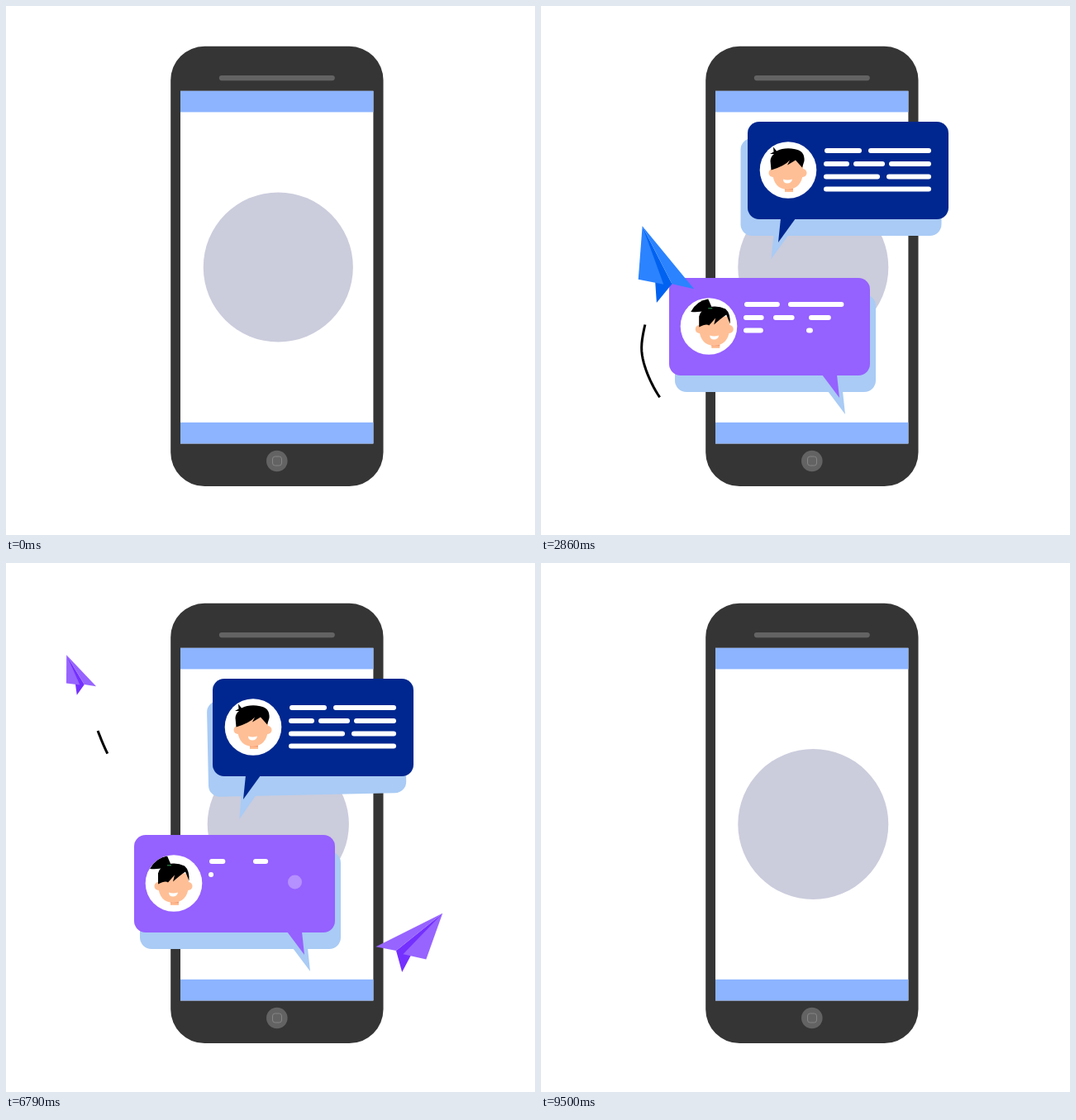
Write an HTML page with a canvas that moves like this. It is 640 by 640 pixels and loops after 9570 ms.

```html
<!DOCTYPE html>
<html lang="en">
<head>
<meta charset="utf-8">
<title>Phone chat</title>
<style>
html, body { margin: 0; width: 100%; height: 100%; overflow: hidden; background: #fff; }
canvas { display: block; width: 640px; height: 640px; }
</style>
</head>
<body>
<canvas id="stage" width="640" height="640"></canvas>
<script>
const ctx = document.getElementById('stage').getContext('2d');
const LOOP = 9570;
const RAD = Math.PI / 180;

const clamp01 = x => Math.max(0, Math.min(1, x));
const progress = (t, start, length) => clamp01((t - start) / length);
const outQuad = x => 1 - (1 - x) ** 2;
const outCubic = x => 1 - (1 - x) ** 3;

function rounded(x, y, w, h, r, color) {
  ctx.fillStyle = color;
  ctx.beginPath();
  ctx.roundRect(x, y, w, h, r);
  ctx.fill();
}
function disc(x, y, r, color) {
  ctx.fillStyle = color;
  ctx.beginPath();
  ctx.arc(x, y, r, 0, 7);
  ctx.fill();
}
function polygon(points, color) {
  ctx.fillStyle = color;
  ctx.beginPath();
  points.forEach(([x, y]) => ctx.lineTo(x, y));
  ctx.closePath();
  ctx.fill();
}
function shape(path, color) {
  ctx.fillStyle = color;
  ctx.fill(path);
}

// ---- Phone ----
function drawPhone(t) {
  rounded(199.2, 48.8, 257.3, 532.2, 41, '#353535');
  rounded(257.8, 84, 140, 6.2, 3.1, '#636363');
  ctx.fillStyle = '#fff';
  ctx.fillRect(211, 102.8, 233.4, 426.6);
  ctx.fillStyle = '#8cb4ff';
  ctx.fillRect(211, 102.8, 233.4, 25.6);
  ctx.fillRect(211, 503.8, 233.4, 25.6);
  disc(327.8, 550.5, 12.8, '#636363');
  ctx.strokeStyle = '#858585';
  ctx.lineWidth = 1;
  ctx.beginPath();
  ctx.roundRect(322.5, 545, 11, 11, 3);
  ctx.stroke();
  const pulse = 89.2 - 5.2 * Math.cos((t - 1395) / LOOP * 4 * Math.PI);
  disc(329.3, 316, pulse, '#cbccdc');
}

// ---- Chat cards ----
const ROWS = [
  [35, [93, 138], [146, 222]],
  [51, [92, 123], [128, 166], [171, 222]],
  [66.5, [92, 160], [168, 222]],
  [81.5, [92, 222]]
];
const BOY_HAIR = new Path2D('M-20.5 0L-21.5-11Q-21-17-17-19.5L-22-19.5-17.5-22-18-28-14-23Q-6-27 4-26 14-25 17-21 20-17 19.5-11L17-3 9-12-1-6 2-12Q-4-5-20.5 0Z');
const GIRL_HAIR = new Path2D('M-19 1V-12Q-17-20-8-23 3-26 13-21 19-16 18.5-3L14-14Q8-10-1-2L1-10-7-1Q-10-4-19 1Z');
const BUN = new Path2D('M-29-17.5Q-22-31-8-33L-4-24Q-11-16-29-17.5Z');
const SMILE = new Path2D('M-6 11Q-1 13 5 11Q4 16-1 16T-6 11Z');
const HEAD = new Path2D('M-19-12H18V4Q16 23-1 23.5-17 23-19 4Z');

const CARDS = [
  {
    x: 250, y: 140, color: '#00278f', pivot: 243, turn: -1, shadow: [-8.5, 20],
    tail: [[40, 117], [37, 146], [58, 117]], avatar: 49, text: [0, 0], hair: BOY_HAIR,
    enter: 70, faceAt: 400, typing: [366, 4594], shadowOut: 6735, out: 6840
  },
  {
    x: 155, y: 329, color: '#9561ff', pivot: 0, turn: 1, shadow: [7, 20],
    tail: [[185, 117], [206, 145], [203, 117]], avatar: 48, text: [-2, -3], hair: GIRL_HAIR, bun: true,
    enter: 1900, faceAt: 2530, typing: [2236, 6595], shadowOut: 8700, out: 8600
  }
];

function drawAvatar(card, t) {
  const pop = progress(t, card.enter + 250, 600);
  if (!pop) return;
  const size = 34.3 * outCubic(pop);
  const slide = 36 * (1 - outQuad(progress(t, card.faceAt, 600)));
  ctx.save();
  ctx.translate(card.avatar, 58.5);
  disc(0, 0, size, '#fff');
  ctx.clip();
  ctx.translate(slide, 0);
  if (card.bun) shape(BUN, '#000');
  ctx.fillStyle = '#ffbf96';
  ctx.fillRect(-4, 18, 10, 8.5);
  ctx.fillStyle = '#f79a70';
  ctx.fillRect(-4, 22.5, 10, 1.5);
  disc(-18.5, 3.5, 5, '#ffbf96');
  disc(17.5, 3.5, 5, '#ffbf96');
  shape(HEAD, '#ffbf96');
  shape(card.hair, '#000');
  if (card.bun) {
    ctx.fillStyle = '#1f6b3a';
    ctx.fillRect(-8, -22.5, 5, 1.5);
  }
  shape(SMILE, '#fff');
  ctx.restore();
}

function drawText(card, t) {
  const [first, second] = card.typing;
  const erase = second - 1430;
  const start = t < second ? first : second;
  const fade = t < second ? 1 - progress(t, erase, 250) : 1;
  ctx.save();
  ctx.translate(...card.text);
  ctx.globalAlpha = fade;
  ctx.strokeStyle = '#fff';
  ctx.lineWidth = 6;
  ctx.lineCap = 'round';
  let order = 0;
  for (const [y, ...parts] of ROWS) {
    for (const [from, to] of parts) {
      const grown = outQuad(progress(t, start + 94 * order++, 800));
      if (!grown) continue;
      const end = Math.max(from + 6.1, from + (to - from) * grown);
      ctx.beginPath();
      ctx.moveTo(from + 3, y);
      ctx.lineTo(end - 3, y);
      ctx.stroke();
    }
  }
  ctx.restore();

  for (let i = 0; i < 3; i++) {
    const shown = progress(t, second - 1095 + i * 170, 60) - progress(t, second - 200 + i * 170, 170);
    if (shown > 0) disc(127.5 + i * 33.5, 57, 8.5, `rgba(255,255,255,${0.45 * shown})`);
  }
}

// Swings about the lower outer corner while growing or shrinking.
function swing(card, t, enter, out, draw) {
  const come = progress(t, enter, 500);
  const leave = progress(t, out, 450) ** 2;
  const size = outCubic(come) * (1 - leave);
  if (size <= 0) return;
  const angle = card.turn * (90 * (1 - come) + 80 * leave);
  ctx.save();
  ctx.translate(card.pivot, 118);
  ctx.rotate(angle * RAD);
  ctx.scale(size, size);
  ctx.translate(-card.pivot, -118);
  draw();
  ctx.restore();
}

function bubble(card, color) {
  rounded(0, 0, 243, 118, 14, color);
  polygon(card.tail, color);
}

function drawCard(card, t) {
  ctx.save();
  ctx.translate(card.x, card.y);
  ctx.save();
  ctx.translate(...card.shadow);
  swing(card, t, card.enter + 70, card.shadowOut, () => bubble(card, '#a9cbf5'));
  ctx.restore();
  swing(card, t, card.enter, card.out, () => {
    bubble(card, card.color);
    drawAvatar(card, t);
    drawText(card, t);
  });
  ctx.restore();
}

// ---- Paper planes ----
function makePath(points) {
  const STEPS = 12;
  const samples = [];
  const lengths = [];
  const point = i => points[Math.max(0, Math.min(points.length - 1, i))];
  for (let n = 0; n <= (points.length - 1) * STEPS; n++) {
    const i = Math.floor(n / STEPS), f = n / STEPS - i;
    const [a, b, c, d] = [-1, 0, 1, 2].map(k => point(i + k));
    samples.push([0, 1].map(k => b[k] + 0.5 * f * (c[k] - a[k]
      + f * (2 * a[k] - 5 * b[k] + 4 * c[k] - d[k] + f * (3 * (b[k] - c[k]) + d[k] - a[k])))));
    const [x, y] = samples[n], [px, py] = samples[n - 1] || samples[n];
    lengths.push((lengths[n - 1] || 0) + Math.hypot(x - px, y - py));
  }
  return {
    arc: i => lengths[i * STEPS],
    at(s) {
      let i = lengths.findIndex(l => l >= s);
      if (i < 0) i = lengths.length - 1;
      if (i === 0) return samples[0];
      const f = clamp01((s - lengths[i - 1]) / (lengths[i] - lengths[i - 1]));
      return [0, 1].map(k => samples[i - 1][k] + (samples[i][k] - samples[i - 1][k]) * f);
    }
  };
}

function track(points, keys) {
  const path = makePath(points);
  return { path, keys: keys.map(([u, i, ...rest]) => [u, path.arc(i), ...rest]) };
}

// Keys: time, path point, scale, rotation, trail length.
const LEFT = track(
  [[275, 612], [215, 545], [170, 503], [139, 466], [122, 420], [128, 376], [133, 360],
   [143, 318], [138, 272], [127, 240], [115, 213], [86, 138], [52, 55]],
  [[0, 0, 0, -50, 0], [350, 2, 0.7, -35, 0], [800, 4, 0.9, -8, 60], [1260, 6, 1, 0, 93],
   [1710, 7, 0.78, -11, 93], [2480, 11, 0.415, -15, 30], [2800, 12, 0.26, -17, 0]]);
const RIGHT = track(
  [[385, 615], [450, 515], [491.7, 459.6], [514, 425], [516, 399], [510, 368], [502, 337],
   [500, 303], [504.6, 269.4], [523, 219], [549, 150], [583, 62]],
  [[0, 0, 0, 50, 0], [330, 2, 0.715, 35, 0], [1000, 5, 0.95, 8, 50], [1750, 8, 0.82, 19.7, 64],
   [2470, 10, 0.38, 15.6, 40], [2800, 11, 0.25, 17, 0]]);

const BLUE = ['#2b83ff', '#0062f0'];
const PURPLE = ['#9764ff', '#7430ff'];
const PLANES = [
  { start: 1150, route: LEFT, flip: 1, colors: BLUE },
  { start: 3100, route: RIGHT, flip: -1, colors: BLUE },
  { start: 4310, route: LEFT, flip: 1, colors: PURPLE },
  { start: 6460, route: RIGHT, flip: -1, colors: PURPLE }
];

function keyed(keys, u, col) {
  const i = Math.max(0, keys.findLastIndex((k, n) => k[0] <= u && n < keys.length - 1));
  const slope = n => {
    const a = keys[Math.max(0, n - 1)], b = keys[Math.min(keys.length - 1, n + 1)];
    return (b[col] - a[col]) / (b[0] - a[0]);
  };
  const a = keys[i], b = keys[i + 1], span = b[0] - a[0], f = (u - a[0]) / span;
  const f2 = f * f, f3 = f2 * f;
  return (2 * f3 - 3 * f2 + 1) * a[col] + (f3 - 2 * f2 + f) * span * slope(i)
    + (3 * f2 - 2 * f3) * b[col] + (f3 - f2) * span * slope(i + 1);
}

function drawPlane({ start, route, flip, colors }, t) {
  const u = t - start;
  if (u <= 0 || u >= 2800) return;
  const [s, size, angle, trail] = [1, 2, 3, 4].map(col => keyed(route.keys, u, col));

  const head = s - 70, tail = Math.max(0, head - trail);
  if (trail > 1 && head > tail) {
    ctx.strokeStyle = '#000';
    ctx.lineWidth = 3;
    ctx.lineCap = 'butt';
    ctx.beginPath();
    for (let i = 0; i <= 20; i++) ctx.lineTo(...route.path.at(tail + (head - tail) * i / 20));
    ctx.stroke();
  }

  const [light, dark] = colors;
  const tip = [-13, -70], fold = [15, 27];
  ctx.save();
  ctx.translate(...route.path.at(s));
  ctx.rotate(angle * RAD);
  ctx.scale(flip * size, size);
  polygon([tip, fold, [-14, 51], [-10, 19]], dark);
  polygon([tip, [-35, 10], [2, 25]], light);
  polygon([tip, fold, [47, 41]], light);
  ctx.restore();
}

function frame() {
  const t = performance.now() % LOOP;
  ctx.fillStyle = '#fff';
  ctx.fillRect(0, 0, 640, 640);
  drawPhone(t);
  CARDS.forEach(card => drawCard(card, t));
  PLANES.forEach(plane => drawPlane(plane, t));
  requestAnimationFrame(frame);
}
frame();
</script>
</body>
</html>
```
